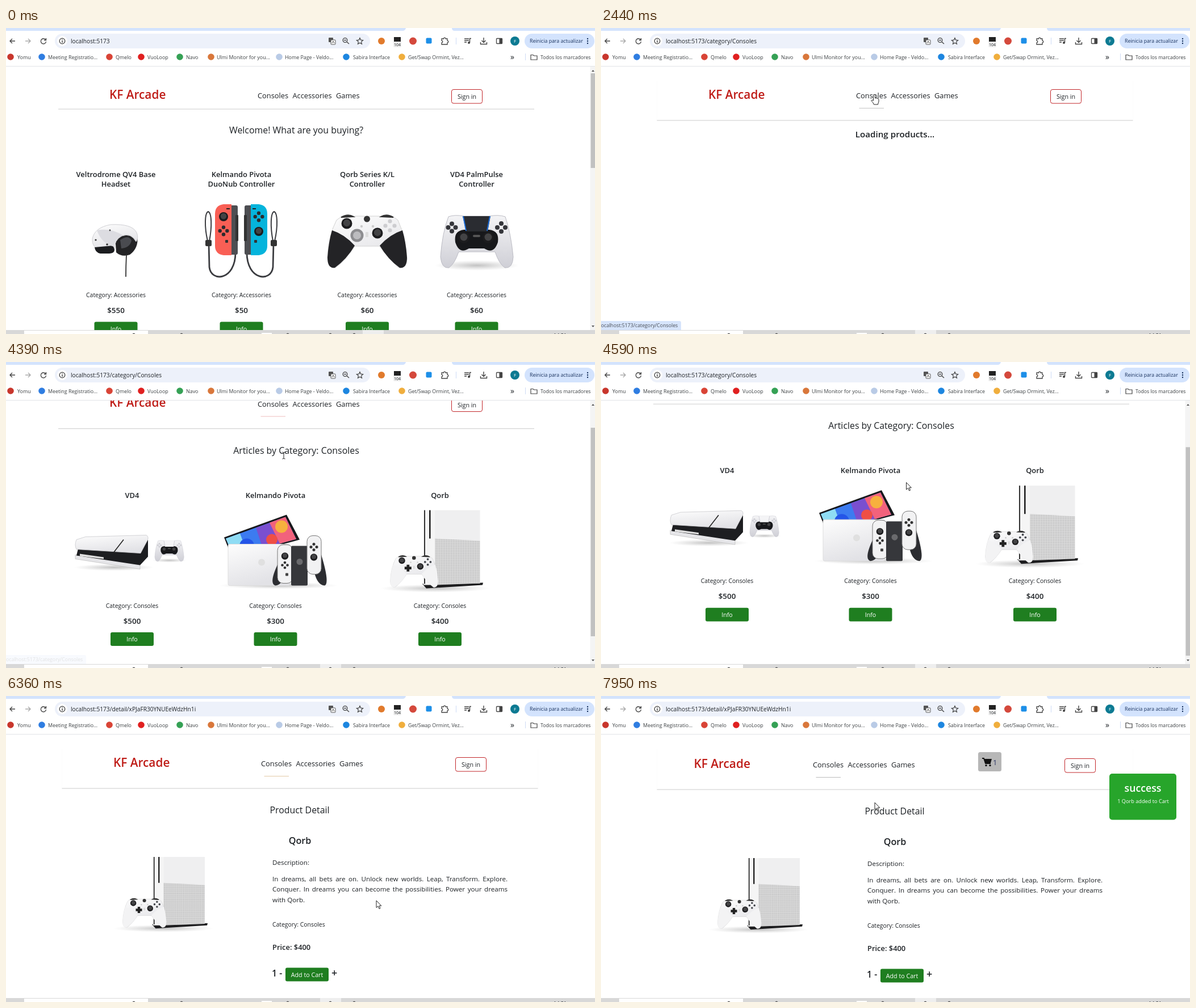
Animation of 1037 by 540 pixels, one loop 8 s. Source, as an HTML page:

```html
<!DOCTYPE html>
<html lang="en">
<head>
<meta charset="utf-8">
<title>Game shop</title>
<style>
html, body { margin: 0; width: 100%; height: 100%; overflow: hidden; background: #fff; }
svg { display: block; width: 1037px; height: 540px; }
text, p { font-family: 'Open Sans', 'Noto Sans', sans-serif; fill: #1d2125; white-space: pre; }
.b { font-weight: 600; }
p { margin: 0; font-size: 11.6px; line-height: 18.7px; color: #1d2125; text-align-last: justify; white-space: nowrap; }
p.end { text-align-last: left; }
</style>
</head>
<body>
<svg id="stage" viewBox="0 0 1037 540"></svg>
<script>
const text = (x, y, size, s, attr = '') => `<text x="${x}" y="${y}" font-size="${size}" ${attr}>${s}</text>`;
const mid = (x, y, size, s, attr = '') => text(x, y, size, s, 'text-anchor="middle" ' + attr);
const bold = 'class="b" ';
const fill = c => `style="fill:${c}"`;
const rect = (x, y, w, h, c, r = 0, attr = '') => `<rect x="${x}" y="${y}" width="${w}" height="${h}" rx="${r}" fill="${c}" ${attr}/>`;
const dot = (x, y, r, c, attr = '') => `<circle cx="${x}" cy="${y}" r="${r}" fill="${c}" ${attr}/>`;
const path = (d, c, attr = '') => `<path d="${d}" fill="${c}" ${attr}/>`;
const line = (d, c = '#444', w = 1.4) => path(d, 'none', `stroke="${c}" stroke-width="${w}"`);
const group = (s, attr) => `<g ${attr}>${s}</g>`;
const place = (s, x, y, k, x0, y0) => group(s, `transform="translate(${x} ${y}) scale(${k}) translate(${-x0} ${-y0})"`);
const mirror = (s, axis) => group(s, `transform="matrix(-1 0 0 1 ${axis * 2} 0)"`);
const diamond = (x, y, d, r, c) => dot(x - d, y, r, c) + dot(x + d, y, r, c) + dot(x, y - d, r, c) + dot(x, y + d, r, c);
const stick = (x, y, r) => dot(x, y, r, '#1c1c1e') + dot(x, y - 1, r * .65, '#434345');
const shadow = (x, y, rx, ry) => `<ellipse cx="${x}" cy="${y}" rx="${rx}" ry="${ry}" fill="url(#soft)"/>`;

// ---- products ----
const visor = () =>
  path('M192 366Q222 350 231 368Q234 388 218 400Q204 405 194 396Z', '#232325') +
  path('M201 374Q216 364 221 375Q218 388 203 389Z', '#4a4b50') +
  path('M152 372Q156 352 184 347Q222 345 230 361Q234 370 229 377Q220 361 204 367Q190 374 191 392L163 391Q151 386 152 372Z', 'url(#shell)', 'stroke="#cfcfd3"') +
  path('M156 387L188 384Q196 397 182 398L166 398Q157 396 156 387Z', '#1b1c1f') +
  path('M160 357Q184 352 206 366Q191 371 190 386Q168 380 160 357Z', '#dcdce1') +
  dot(158, 374, 1.6, '#333') + dot(178, 382, 1.8, '#333') + dot(183, 357, 1.4, '#444') +
  line('M212 400Q211 420 211 439', '#333', 1.8);

const halfPad = (c, stickY, btnY) =>
  line('M355 376C349 350 350 326 356 324C362 326 363 350 358 376', '#3b3c40', 2) +
  line('M357 380L358 422C361 449 404 446 404 396', '#3b3c40', 2.8) +
  rect(351, 374, 11, 11, '#333', 2) +
  rect(394, 313, 14, 87, '#4d4e52', 3) + rect(404, 330, 5, 46, '#333', 1) +
  path('M397 311V401H383Q368 399 368 384V328Q368 313 383 311Z', c) +
  stick(383, stickY, 8) + diamond(383, btnY, 6.3, 3.2, '#2b2b2e') +
  rect(388, 318, 6, 2, '#222') + rect(386, 374, 5, 5, '#333', 1);

const twinPads = () => halfPad('#f95f55', 333, 358) + mirror(halfPad('#05b4dc', 359, 333), 414);

const grip = 'M574 357Q596 364 614 384Q600 408 579 423Q566 425 566 405Q568 377 574 357Z';
const wingPad = (gripColor, cross) =>
  path('M582 339Q594 328 612 332H660Q678 328 690 339Q704 370 706 408Q704 425 692 423Q677 411 658 385H614Q596 412 580 423Q567 425 566 405Q568 365 582 339Z', 'url(#shell)', 'stroke="#d2d2d2"') +
  path('M590 334Q602 327 612 333ZM682 334Q670 327 660 333Z', '#333', 'stroke="#333" stroke-width="2"') +
  path(grip, gripColor) + mirror(path(grip, gripColor), 636) +
  stick(600, 345, 9.5) + stick(654, 362, 9.5) + dot(635.5, 337, 5.5, '#333') +
  (cross ? path('M614 357h8v6h6v8h-6v6h-8v-6h-6v-8h6Z', '#222') + diamond(676, 349, 8, 3.2, '#44474d')
    : dot(618, 366, 11.5, '#8d8d90') + dot(618, 366, 7, '#bcbcbf') + diamond(676, 349, 8, 3.6, '#cdcdd0')) +
  dot(626, 350, 2.2, '#ccc') + dot(646, 350, 2.2, '#ccc') + rect(633, 360, 5, 9, '#ddd', 1);

const curvePad = (pad = '#2a2c31', keys = '#35363b', rim = '#1b6fe0') =>
  shadow(829, 419, 74, 9) +
  path('M779 333Q790 329 806 332H851Q867 329 879 333Q889 362 893 404Q892 425 878 423Q868 416 861 395H797Q790 416 780 423Q767 425 765 404Q768 362 779 333Z', 'url(#shade)', 'stroke="#bcbcc4"') +
  path('M806 356H851Q869 358 866 378Q859 400 842 389H815Q798 400 791 378Q788 358 806 356Z', '#17181b') +
  path('M804 332H853L848 359H810Z', pad) + line('M805 332L810 358M852 332L847 358', rim, 1.8) +
  stick(806, 370, 10) + stick(849, 370, 10) +
  diamond(785, 352, 6.5, 4, keys) + diamond(872, 352, 7, 4, keys) + rect(822, 365, 13, 4, '#555', 2);

const slab = () =>
  shadow(190, 317, 70, 6) +
  path('M122 295L236 309V320L122 302Z', '#e6e6e9', 'stroke="#bbb" stroke-width=".7"') +
  path('M127 284L237 291L250 268V298L236 313L124 296Z', '#1d1e21') +
  path('M140 263L247 260Q252 263 249 269L237 292L124 285Q120 278 124 268Z', 'url(#shell)', 'stroke="#c8c8cc" stroke-width=".8"') +
  line('M190 290L207 268', '#222', 1.6) + path('M130 293L172 299V302L130 297Z', '#e0e0e0') +
  place(curvePad('#f4f4f6', '#d0d0d6', '#c4c4cc'), 262, 269, .4, 765, 330);

const tablet = () =>
  shadow(480, 349, 105, 6) +
  path('M384 264L494 224L517 268L398 300Z', '#17181b') +
  path('M387 266L492 228L511 267L400 297Z', '#3c7bf0') +
  path('M387 266L412 257L424 290L400 297Z', '#8fdcf4') +
  path('M440 247L466 238L486 274L452 283Z', '#7a4fd0') +
  path('M464 238L492 228L511 267L482 275Z', '#f2627c') +
  dot(485, 245, 11, '#f7b03e') + dot(424, 279, 13, '#2455e8') + dot(468, 268, 10, '#ef4f45') +
  rect(391, 276, 109, 73, 'url(#shell)', 3, 'stroke="#ddd"') + dot(450, 308, 6, '#e0e0e0') +
  path('M480 308Q462 345 474 349Q487 348 493 326ZM553 288Q571 345 561 349Q548 348 543 326Z', '#2c2d31') +
  rect(478, 277, 27, 68, '#f2f2f3', 10, 'stroke="#777"') + rect(502, 279, 29, 70, '#36373b', 2) +
  rect(530, 261, 25, 68, '#f2f2f3', 10, 'stroke="#777"') +
  stick(491, 297, 6.2) + diamond(491, 313, 4.5, 2.3, '#333') + rect(492, 327, 5, 5, '#444', 1) +
  stick(542, 299, 6.2) + diamond(542, 281, 5, 2.5, '#333') + dot(517, 307, 5.5, '#6a6a6d');

const tower = () =>
  shadow(755, 354, 96, 7) +
  path('M733 346L840 344L839 348L740 354Z', '#1d1d1f') +
  rect(735, 216, 20, 132, '#f5f5f5') + rect(736, 216, 2, 130, '#333') + rect(745, 216, 2.6, 50, '#222') +
  rect(755, 216, 79.5, 129, '#efeff0') +
  path('M755 266L834.5 270V345L755 348Z', '#dedede') + path('M755 266L834.5 270V345L755 348Z', 'url(#mesh)') +
  place(wingPad('#f3f3f4', true), 676, 296, .6, 565, 330);

// ---- pages ----
const button = (x, y, s) => rect(x, y, 76, 24, '#1f7e20', 3) + mid(x + 38, y + 16, 10.7, s, fill('#fff'));

function header(left, logo, nav, sign, dy, bottom, under) {
  const names = ['Consoles', 'Accessories', 'Games'];
  return rect(left, 92, 838, bottom - 92, '#fff', 0, 'filter="url(#lift)"') +
    line(`M${left} ${bottom}H${left + 838}`, '#d2d2d2', 1) +
    text(logo, 124.5 + dy, 20.8, 'KF Arcade', bold + fill('#bf1d18')) +
    names.map((s, i) => text(nav + [0, 61.5, 138][i], 124 + dy, 12.8, s)).join('') +
    rect(sign + .5, 108.5 + dy, 54, 24.5, '#fff', 3.5, 'stroke="#c2272b"') +
    mid(sign + 27.5, 125 + dy, 10.7, 'Sign in') +
    (under ? line(`M${nav + 5.5} ${141.5 + dy}h43.5`, under, 1) : '');
}

const scrollbar = (h, id = '') => rect(1028.5, 67, 9, 466, '#f4f4f4') +
  rect(1029.5, 80, 7.5, h, '#c1c1c1', 0, id) +
  path('M1031 77l2.5-3 2.5 3ZM1031 525l2.5 3 2.5-3Z', '#555');

const card = (x, y, names, art, cat, catY, price) =>
  names.map((s, i) => mid(x, y + 17 * i, 12.9, s, bold)).join('') + art +
  mid(x, catY, 10.4, 'Category: ' + cat) + mid(x, catY + 28, 13.4, price, bold) +
  button(x - 38, catY + 43.5, 'Info');

const heading = (x, y, s) => mid(x, y, 15.9, s);

const home = header(92, 182, 443, 784, 0, 143) + heading(511, 186, 'Welcome! What are you buying?') +
  [[193.5, ['Veltrodrome QV4 Base', 'Headset'], visor, '$550'],
   [414.5, ['Kelmando Pivota', 'DuoNub Controller'], twinPads, '$50'],
   [636, ['Qorb Series K/L', 'Controller'], () => wingPad('#232326'), '$60'],
   [828.5, ['VD4 PalmPulse', 'Controller'], curvePad, '$60']]
    .map(([x, names, art, price]) => card(x, 263, names, art(), 'Accessories', 475, price)).join('') +
  scrollbar(167);

const loading = header(98.5, 189, 449, 791, 0, 163, '#c4c4c4') +
  mid(517.5, 193, 15.2, 'Loading products...', bold);

const consoles = header(92, 182, 443, 784, 0, 163, '#eebcbc') + heading(511, 207, 'Articles by Category: Consoles') +
  [[222, 'VD4', slab, '$500'], [474.5, 'Kelmando Pivota', tablet, '$300'], [764, 'Qorb', tower, '$400']]
    .map(([x, name, art, price]) =>
      card(x, 285, [name], group(art(), 'transform="translate(0 91)"'), 'Consoles', 479, price)).join('');

const detail = heading(517, 207, 'Product Detail') + mid(517.5, 261, 16.2, 'Qorb', bold) +
  place(tower(), 204, 284, .915, 675, 216) + text(469, 298, 11.6, 'Description:') +
  `<foreignObject x="469" y="313.5" width="414" height="60">
    <p>In dreams, all bets are on. Unlock new worlds. Leap, Transform. Explore.</p>
    <p>Conquer. In dreams you can become the possibilities. Power your dreams</p>
    <p class="end">with Qorb.</p></foreignObject>` +
  text(469, 407, 10.4, 'Category: Consoles') + text(469, 448, 12.9, 'Price: $400', bold) +
  text(468, 495, 16, '1 -', bold) + button(492, 479.5, 'Add to Cart') + text(573, 495, 18, '+', bold);

const cartHeader = header(98.5, 163.5, 373, 816, 2, 165, '#bbb') + rect(664, 99, 41, 34, '#b7b7b7', 3.5) +
  line('M671 110h3l3 9h9', '#111', 1.8) + path('M674 111h14l-2 7h-10Z', '#111') +
  dot(678, 122.5, 1.7, '#111') + dot(685, 122.5, 1.7, '#111') + text(690, 121.5, 13, '1', fill('#2c3566'));

const toast = rect(895, 137, 118, 81.5, '#27a52b', 5) + mid(954, 169, 17.7, 'success', bold + fill('#fff')) +
  mid(954.5, 189, 9.2, '1 Qorb added to Cart', fill('#fff'));

// ---- browser frame ----
const marks = [
  [8, 20, '#c8362c', 'Yomu'], [63, 74, '#2f7de1', 'Meeting Registratio...'], [182, 193, '#d94436', 'Qmelo'],
  [238, 249, '#e02020', 'VuoLoop'], [306, 317, '#35a155', 'Navo'], [361, 371, '#d9773b', 'Ulmi Monitor for you...'],
  [481, 491, '#b9cbe6', 'Home Page - Veldo...'], [599, 611, '#1d86e0', 'Sabira Interface'],
  [697, 708, '#f0ae3d', 'Get/Swap Ormint, Vez...']];

const chrome = rect(0, 0, 1037, 67, '#fff') + path('M0 0H704Q703 5 698 5H0ZM785 0H1037V5H790Q785 5 785 0Z', '#d3e3fd') +
  rect(0, 67, 1037, 1, '#e2e4e8') + rect(86, 10, 555, 26, '#edf1fa', 13) + dot(99, 23, 9, '#fff') +
  line('M16 23H7M11 19L7 23L11 27') + line('M34 23H43M39 19L43 23L39 27', '#aaa') +
  line('M69.5 20.5A4.6 4.6 0 1 0 70.5 24M70.5 18V21.5H67') +
  dot(99, 23, 4.8, 'none', 'stroke="#444" stroke-width="1.3"') + line('M99 22V26M99 19.8V21') +
  rect(568, 17, 8, 8, '#555', 1) + rect(572, 21, 8, 8, '#fff', 1, 'stroke="#555"') + line('M574 27l2-4 2 4', '#555', 1) +
  dot(597, 21.5, 3.8, 'none', 'stroke="#444" stroke-width="1.3"') + line('M600 24.5L604 28M595 21.5H599') +
  path('M623 17.5l1.6 3.7 4 .4-3 2.7.9 4-3.5-2.1-3.5 2.1.9-4-3-2.7 4-.4Z', 'none', 'stroke="#444" stroke-width="1.2"') +
  dot(661, 23, 6, '#e17a2c') + rect(683, 16, 12, 9, '#222') + rect(682, 24, 14, 10, '#eee', 2) + mid(689, 31.5, 7, '104') +
  dot(716.5, 23, 6.5, '#d4493c') + rect(739.5, 17.5, 10, 10, '#1d8fe8', 2) +
  path('M767 19h3.5a1.8 1.8 0 0 1 3.6 0H777v3.4a1.8 1.8 0 0 1 0 3.6V29H767v-3a1.8 1.8 0 0 0 0-3.6Z', 'none', 'stroke="#444" stroke-width="1.3"') +
  rect(792, 17, 1, 12, '#cfdcf5') + line('M807 19H815M807 22H815M807 25H811M816.5 26V18.5H819') + dot(815, 26, 2, '#444') +
  line('M841 17V25M837.5 22L841 25.5L844.5 22M835.5 25V28.5H846.5V25') +
  rect(863.5, 18.5, 10, 9, '#fff', 1, 'stroke="#444" stroke-width="1.3"') + rect(868.5, 18, 5, 10, '#444') +
  dot(896, 23, 8, '#0c7a92') + mid(896, 26, 8, 'F', fill('#fff')) +
  rect(913, 10, 123, 26, '#d3e3fd', 13) + text(922, 26, 8.75, 'Reinicia para actualizar', fill('#17305c')) +
  [19, 23, 27].map(y => dot(1024, y, 1.2, '#17305c')).join('') +
  marks.map(([x, tx, c, s]) => dot(x, 51, 5.8, c) + text(tx, 54.5, 8.9, s, fill('#3c4043'))).join('') +
  text(888, 56, 14, '»') + rect(923, 45, 1, 12, '#cfdcf5', 0, 'transform="translate(-9 0)"') +
  path('M924 47.5h4l1.5 1.5H935v7H924Z', 'none', 'stroke="#444" stroke-width="1.2"') +
  text(941, 54.5, 8.7, 'Todos los marcadores', fill('#3c4043')) + text(114, 26.7, 10.2, '', 'id="url"');

const taskbar = rect(0, 533, 1037, 7, '#d8d8d8') + rect(32, 534, 218, 6, '#fff') +
  rect(553, 533, 37, 7, '#eeeeee', 0, 'id="task"') + rect(450, 538, 18, 2, '#fff') +
  [225, 309, 496, 571, 613].map(x => dot(x, 541, 2.5, '#555')).join('') + text(964, 545.5, 9, '14:51');

const tip = (s, w, id) => group(path(`M0 517H${w - 3}Q${w} 517 ${w} 520V533H0Z`, '#d6e4fb') +
  text(-2.2, 528, 8.75, s, fill('#4a4f57')), `id="${id}"`);

const defs = `<defs>
  <linearGradient id="shell" x2=".4" y2="1"><stop stop-color="#fdfdfd"/><stop offset="1" stop-color="#e2e2e6"/></linearGradient>
  <linearGradient id="shade" x2="0" y2="1"><stop stop-color="#f4f4f6"/><stop offset="1" stop-color="#cfcfd6"/></linearGradient>
  <radialGradient id="soft"><stop stop-color="#777" stop-opacity=".45"/><stop offset="1" stop-color="#999" stop-opacity="0"/></radialGradient>
  <pattern id="mesh" width="3" height="3" patternUnits="userSpaceOnUse"><circle cx="1.5" cy="1.5" r=".8" fill="#9c9c9e"/></pattern>
  <filter id="lift" x="-2%" y="-10%" width="104%" height="125%"><feDropShadow dx="0" dy=".5" stdDeviation=".6" flood-opacity=".1"/></filter>
</defs>`;

const host = 'localhost:5173', listPath = '/category/Consoles', itemPath = '/detail/xPJaFR30YNUEeWdzHn1i';
const edge = 'stroke="#222" stroke-width="1" stroke-linejoin="round"';
const stage = document.getElementById('stage');
stage.innerHTML = defs + rect(0, 0, 1037, 540, '#fff') +
  group(home, 'id="home"') + group(loading, 'id="loading"') +
  group(group(consoles, 'id="list"') + scrollbar(368, 'id="thumb"'), 'id="consoles"') +
  group(group(header(98.5, 189, 449, 791, 0, 163, '#e3c9a6'), 'id="plain"') + group(cartHeader, 'id="cart"') +
    group(detail, 'id="body"') + group(toast, 'id="toast"'), 'id="detail"') +
  tip(host + listPath, 141, 'tipList') + tip(host + itemPath, 192, 'tipItem') + chrome + taskbar +
  dot(0, 0, 9, '#d8d000', 'id="ring" opacity=".8"') +
  group(path('M0 0V12.5L3 9.8L5 14.5L7 13.6L5 9.2H8.8Z', '#fff', edge + ' id="arrow"') +
    path('M-1.5 1Q0-1 1.5 1V7Q3 5.5 4 7Q6 6 6.5 8Q8 7.5 8 9.5V13Q7 15 6.5 18H-.5Q-2 14-5 11.5Q-5 9-1.5 11Z', '#fff', edge + ' id="hand"') +
    group(line('M-2.5-6Q0-6 0-4.5V4.5Q0 6-2.5 6M2.5-6Q0-6 0-4.5M0 4.5Q0 6 2.5 6', '#222', 1), 'id="beam"'), 'id="cursor"');

// ---- motion ----
const $ = Object.fromEntries([...stage.querySelectorAll('[id]')].map(e => [e.id, e]));
const show = (id, on) => $[id].style.display = on ? '' : 'none';
const within = (t, a, b) => t >= a && t < b;
const route = [
  [260, 984, 505], [1000, 288, 127], [1070, 283, 124], [1540, 483, 129], [1820, 481, 117], [2710, 481, 117],
  [2950, 470, 138], [3180, 484, 156], [4250, 484, 156], [4390, 489, 165], [4600, 540, 215], [5010, 724, 394],
  [5280, 750, 441], [5690, 750, 441], [6030, 706, 382], [6355, 706, 382], [6360, 652, 361], [6800, 525, 491],
  [7220, 525, 491], [7420, 605, 390], [7830, 605, 390], [7950, 482, 188]];
const scrollKeys = [[4250, 0], [4390, 45.5], [4600, 91]];

// Linear interpolation through [time, ...values] keys.
function along(keys, t) {
  const i = keys.findIndex(k => k[0] > t);
  if (i === 0) return keys[0].slice(1);
  if (i < 0) return keys[keys.length - 1].slice(1);
  const [a, b] = [keys[i - 1], keys[i]], f = (t - a[0]) / (b[0] - a[0]);
  return a.slice(1).map((v, j) => v + (b[j + 1] - v) * f);
}

function draw(t) {
  const page = t < 2160 ? 'home' : t < 3840 ? 'loading' : t < 5760 ? 'consoles' : 'detail';
  for (const id of ['home', 'loading', 'consoles', 'detail']) show(id, id === page);
  $.url.textContent = host + (page === 'home' ? '' : page === 'detail' ? itemPath : listPath);
  $.task.setAttribute('x', page === 'home' ? 628 : 553);

  const [scroll] = along(scrollKeys, t);
  $.list.setAttribute('transform', `translate(0 ${-scroll})`);
  $.thumb.setAttribute('y', 80 + scroll * 72 / 91);

  const added = t >= 6930;
  show('plain', !added); show('cart', added); show('toast', added);
  $.body.setAttribute('transform', `translate(0 ${added ? 2 : 0})`);

  show('tipList', within(t, 1880, 4420));
  $.tipList.setAttribute('opacity', t < 4250 ? 1 : Math.max(0, 1 - (t - 4250) / 165));
  show('tipItem', within(t, 5480, 5900));

  const [x, y] = along(route, t);
  show('cursor', t >= 260);
  $.cursor.setAttribute('transform', `translate(${x} ${y})`);
  const hand = within(t, 1420, 2860) || within(t, 5150, 5800) || within(t, 6740, 7270);
  const beam = within(t, 2960, 4530);
  show('hand', hand); show('beam', beam); show('arrow', !hand && !beam);
  $.ring.setAttribute('cx', x - 1);
  $.ring.setAttribute('cy', y + 1);
  show('ring', within(t, 1880, 2090) || within(t, 5480, 5650) || within(t, 6820, 6960));
}

let start;
function tick(now) {
  start ??= now;
  draw((now - start) % 8000);
  requestAnimationFrame(tick);
}
draw(0);
requestAnimationFrame(tick);
</script>
</body>
</html>
```
